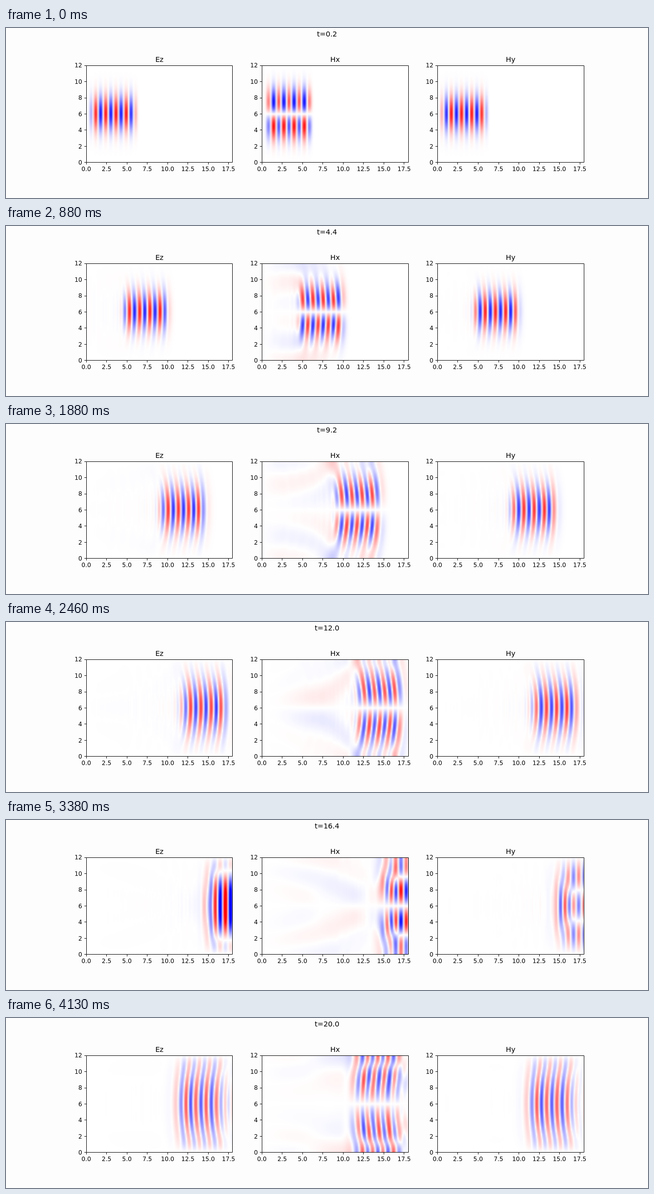
An HTML page with a canvas that plays this animation: 1280 px wide and 341 px high, repeating every 4.18 s.

```html
<!DOCTYPE html>
<html lang="en">
<head>
<meta charset="utf-8">
<title>Wave packet in a closed box</title>
<style>
  html, body { margin: 0; width: 100%; height: 100%; overflow: hidden; background: #fdfdfd; }
  canvas, svg { position: absolute; left: 0; top: 0; width: 1280px; height: 341px; }
  text { font-family: "DejaVu Sans", sans-serif; font-size: 11.85px; fill: #000; }
  .title { font-size: 14.22px; text-anchor: middle; }
  path { fill: none; stroke: #000; stroke-width: .95; }
</style>
</head>
<body>
<canvas id="stage" width="1280" height="341"></canvas>
<svg id="axes" viewBox="0 0 1280 341">
  <text id="clock" class="title" x="640" y="17.4"></text>
</svg>
<script>
const WIDTH = 18, HEIGHT = 12, LOOP = 4180, FRAMES = 100, FRAME_DT = 0.2;
const BOX = { w: 291.76, top: 75.1, h: 194.5, lefts: [160, 510.12, 860.24] };
const UNIT = BOX.w / WIDTH;

// Staggered grid: Ez on nodes, Hx between rows, Hy between columns.
const DX = 0.12, DT = 0.02, COLS = 150, ROWS = 100, NX = COLS + 1, NY = ROWS + 1;
const STEPS = Math.round(FRAME_DT / DT);
const WAVE_K = 5, LENGTH = 2 * Math.PI, RAMP = 1.05, SIGMA = 1.5, LAG = 0.06;

const PANELS = [
  { name: 'Ez', limit: 1.1 },
  { name: 'Hx', limit: 0.1 },
  { name: 'Hy', limit: 1.1 }
];

const clamp = (v, lo, hi) => Math.max(lo, Math.min(hi, v));
const pulse = s => -clamp(Math.min(s, LENGTH - s) / RAMP, 0, 1) * Math.sin(WAVE_K * s);
const profile = y => Math.exp(-((y - HEIGHT / 2) ** 2) / (2 * SIGMA ** 2));

function pulseIntegral(s) {
  const end = clamp(s, 0, LENGTH), n = 400, h = end / n;
  let sum = 0;
  for (let i = 0; i < n; i++) sum += pulse((i + 0.5) * h);
  return sum * h;
}

function initialFields() {
  const [ez, hx, hy, a] = Array.from({ length: 4 }, () => new Float32Array(NX * NY));
  for (let i = 0; i < NX; i++) {
    const s = i * DX + LAG;
    const e = pulse(s), p = pulseIntegral(s + DT / 2);
    for (let j = 0; j < NY; j++) {
      const g = profile(j * DX);
      a[j * NX + i] = p * g;
      if (i > 0 && j > 0 && i < NX - 1 && j < NY - 1) ez[j * NX + i] = e * g;
    }
  }
  // H is the curl of the potential, half a step earlier.
  for (let j = 0; j < NY; j++) {
    for (let i = 0; i < NX; i++) {
      const n = j * NX + i;
      if (j < NY - 1) hx[n] = (a[n + NX] - a[n]) / DX;
      if (i < NX - 1) hy[n] = -(a[n + 1] - a[n]) / DX;
    }
  }
  return [ez, hx, hy];
}

function advance([ez, hx, hy]) {
  const c = DT / DX;
  for (let j = 0; j < NY; j++) {
    for (let i = 0; i < NX; i++) {
      const n = j * NX + i;
      if (j < NY - 1) hx[n] -= c * (ez[n + NX] - ez[n]);
      if (i < NX - 1) hy[n] += c * (ez[n + 1] - ez[n]);
    }
  }
  for (let j = 1; j < NY - 1; j++) {
    for (let i = 1; i < NX - 1; i++) {
      const n = j * NX + i;
      ez[n] += c * (hy[n] - hy[n - 1] - hx[n] + hx[n - NX]);
    }
  }
}

// Blue - white - red colours, one pixel per cell, with y pointing up.
function toImage(field, limit) {
  const image = new ImageData(COLS, ROWS);
  for (let j = 0; j < ROWS; j++) {
    for (let i = 0; i < COLS; i++) {
      const v = clamp(field[(ROWS - 1 - j) * NX + i] / limit, -1, 1);
      image.data.set([255 * (1 + Math.min(v, 0)), 255 * (1 - Math.abs(v)), 255 * (1 - Math.max(v, 0)), 255],
        4 * (j * COLS + i));
    }
  }
  return image;
}

function simulate() {
  const fields = initialFields(), frames = [];
  while (frames.length < FRAMES) {
    for (let s = 0; s < STEPS; s++) advance(fields);
    frames.push(PANELS.map(({ limit }, p) => toImage(fields[p], limit)));
  }
  return frames;
}

const svg = document.getElementById('axes');
const clock = document.getElementById('clock');
const crisp = v => Math.floor(v + 0.2) + 0.5;

function addNode(tag, attrs, label) {
  const node = document.createElementNS(svg.namespaceURI, tag);
  for (const key in attrs) node.setAttribute(key, attrs[key]);
  if (label) node.textContent = label;
  svg.append(node);
}

function drawAxes(left, name) {
  const x0 = crisp(left), x1 = crisp(left + BOX.w);
  const y0 = crisp(BOX.top), y1 = crisp(BOX.top + BOX.h);
  let d = `M${x0} ${y0}H${x1}V${y1}H${x0}Z`;
  for (let v = 0; v < WIDTH; v += 2.5) {
    const x = left + v * UNIT;
    d += `M${crisp(x)} ${y1}v4.2`;
    addNode('text', { x, y: 287, 'text-anchor': 'middle' }, v.toFixed(1));
  }
  for (let v = 0; v <= HEIGHT; v += 2) {
    const y = BOX.top + BOX.h - v * UNIT;
    d += `M${x0} ${crisp(y)}h-4.2`;
    addNode('text', { x: left - 8.1, y: y + 4.4, 'text-anchor': 'end' }, String(v));
  }
  addNode('path', { d });
  addNode('text', { x: left + BOX.w / 2, y: 68, class: 'title' }, name);
}

const ctx = document.getElementById('stage').getContext('2d');
const buffer = Object.assign(document.createElement('canvas'), { width: COLS, height: ROWS });
const bufferCtx = buffer.getContext('2d');

function drawField(image, p) {
  bufferCtx.putImageData(image, 0, 0);
  ctx.drawImage(buffer, BOX.lefts[p], BOX.top, BOX.w, BOX.h);
}

PANELS.forEach(({ name }, p) => drawAxes(BOX.lefts[p], name));
const frames = simulate();
const start = performance.now();
let shown = -1;

// 24 pictures a second, on a clock of hundredths.
function frameAt(ms) {
  const ticks = Math.floor((ms % LOOP) / 10);
  return clamp(Math.ceil(6 * (2 * ticks + 1) / 50) - 1, 0, FRAMES - 1);
}

function render() {
  const index = frameAt(Math.max(0, performance.now() - start));
  if (index !== shown) {
    shown = index;
    ctx.clearRect(0, 0, 1280, 341);
    frames[index].forEach(drawField);
    clock.textContent = 't=' + ((index + 1) * FRAME_DT).toFixed(1);
  }
  requestAnimationFrame(render);
}
render();
</script>
</body>
</html>
```
